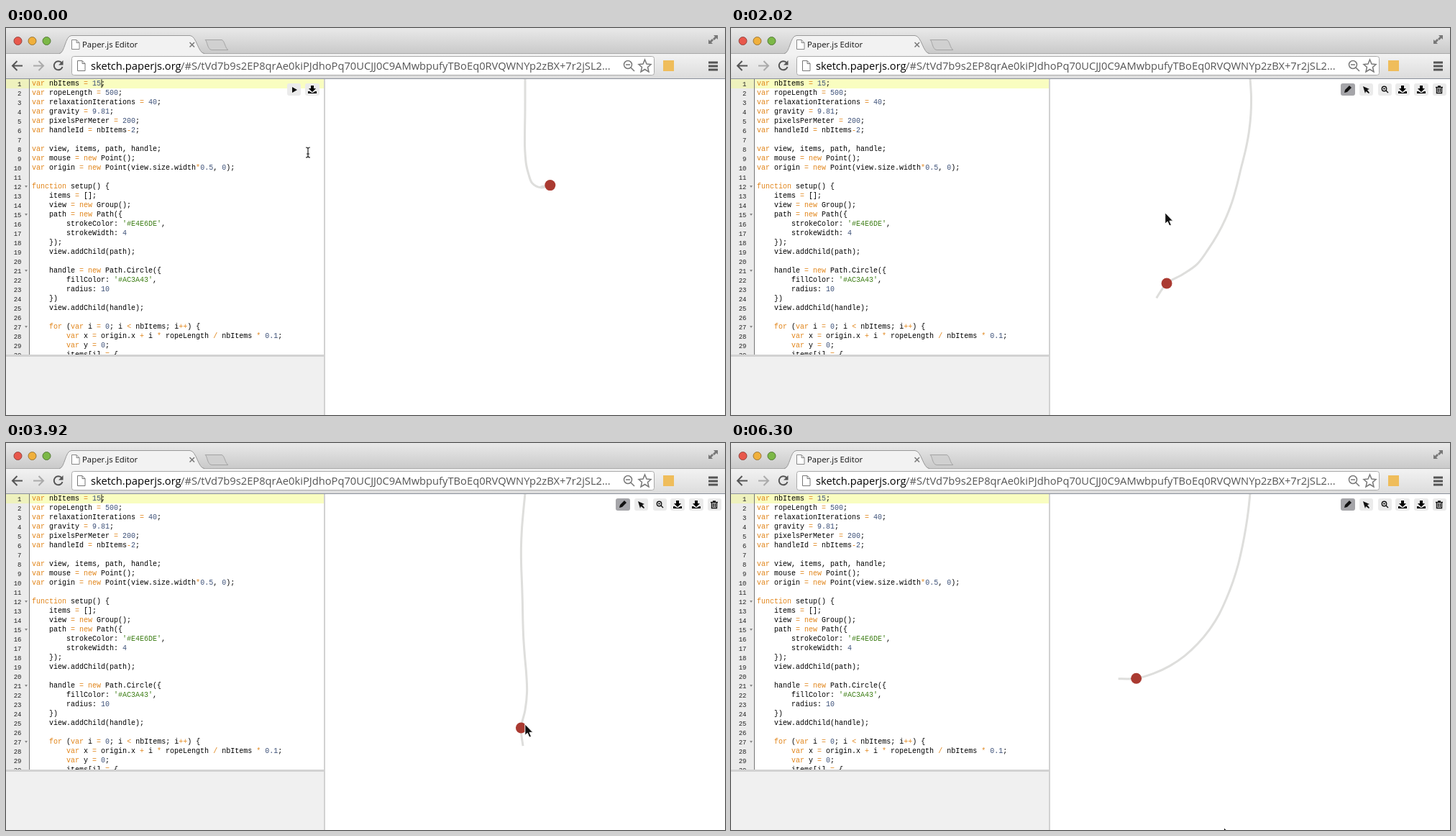
An HTML page for the animation above (6.32 s loop, 1000 by 538 pixels).

```html
<!DOCTYPE html>
<html lang="en">
<head>
<meta charset="utf-8">
<title>Paper.js Editor</title>
<style>
  html, body { margin: 0; width: 100%; height: 100%; overflow: hidden; background: #fff; }
  svg { display: block; width: 1000px; height: 538px; }
  text { white-space: pre; }
  .ui { font-family: "Open Sans", "Noto Sans", sans-serif; }
  #code, #numbers { font: 10px "Liberation Mono", monospace; fill: #000; }
  #numbers { text-anchor: end; font-size: 9px; fill: #222; }
  .word { fill: #e1851a; }
  .num { fill: #3c5078; }
  .str { fill: #3c7d14; }
  .line { fill: none; stroke: #555; stroke-width: 2; }
  .button rect { fill: #ebebeb; }
  .button .ink { fill: none; stroke: #111; stroke-width: 1.4; }
  .button .solid { fill: #111; }
</style>
</head>
<body>
<svg viewBox="0 0 1000 538">
  <defs>
    <linearGradient id="title" x2="0" y2="1"><stop stop-color="#e9e9e9"/><stop offset="1" stop-color="#c9c9c9"/></linearGradient>
    <linearGradient id="bar" x2="0" y2="1"><stop stop-color="#f3f3f3"/><stop offset="1" stop-color="#dcdcdc"/></linearGradient>
    <clipPath id="stage"><path d="M444 71H1000V538H444Z"/></clipPath>
    <clipPath id="editor"><path d="M0 71H442V454H0Z"/></clipPath>
    <g id="download"><path class="solid" d="M8 3h4v4h3l-5 5-5-5h3zM4 11h2l3 2h2l3-2h2v3H4z"/></g>
  </defs>
  <rect width="1000" height="538" fill="#fff"/>

  <g id="chrome">
    <rect width="1000" height="36" fill="url(#title)"/>
    <rect y="35" width="1000" height="35" fill="url(#bar)"/>
    <path d="M0 35.5H76M274 35.5H1000" stroke="#aaa"/>
    <path d="M74 36C82 35 82 11 91 10.5H256C265 11 267 35 276 36Z" fill="#f2f2f2"/>
    <path d="M74 35.5C82 35 82 11 91 10.5H256C265 11 267 35 276 35.5" fill="none" stroke="#999"/>
    <path d="M277 16.5H300C304 17 305 29 309 30.5H286C280 30 280 18 277 16.5Z" fill="#d0d0d0" stroke="#a4a4a4"/>
    <circle cx="16.5" cy="18" r="5.5" fill="#e8584c" stroke="#94443e"/>
    <circle cx="36.5" cy="18" r="5.5" fill="#f0b03c" stroke="#997535"/>
    <circle cx="56.5" cy="18" r="5.5" fill="#7cb847" stroke="#547a36"/>
    <path d="M91.5 16.5H98L102 20.5V29.5H91.5ZM98 16.5V20.5H102" fill="#fff" stroke="#888"/>
    <text class="ui" x="106" y="27" font-size="11.4" fill="#111">Paper.js Editor</text>
    <path d="M255.5 20L262 26.5M262 20L255.5 26.5" stroke="#777" stroke-width="1.5"/>
    <path d="M984 10H990V16L988 14 985 17 983 15 986 12ZM977 16V22H983L981 20 984 17 982 15 979 18Z" fill="#777"/>
    <path class="line" d="M23 52.5H9M15.5 46L9 52.5L15.5 59"/>
    <path class="line" d="M38 52.5H52M45.5 46L52 52.5L45.5 59" style="stroke:#aaa"/>
    <path class="line" d="M77 48A6 6 0 1 0 78.5 54"/><path d="M79.5 45V51.5H73Z" fill="#555"/>
    <rect x="91.5" y="39.5" width="810" height="26" rx="3" fill="#fff" stroke="#aaa"/>
    <path d="M99.5 45.5H106L110 49.5V59.5H99.5ZM106 45.5V49.5H110" fill="#fff" stroke="#777"/>
    <text class="ui" x="118" y="58" font-size="14.7" fill="#000">sketch.paperjs.org</text>
    <text class="ui" x="243" y="58" font-size="14.7" fill="#555">/#S/tVd7b9s2EP8qrAe0kiPJdhoPq70UCJJ0C9AMwbpufyTBoEq0RVQWNYp2zBX+7r2jSL2...</text>
    <g fill="none" stroke="#777" stroke-width="1.5">
      <circle cx="865" cy="51" r="5.5"/><path d="M862 51H868M869 55L874 60"/>
      <path d="M888.5 44L891 50 897 50.5 892.5 54.5 894 61 888.5 57.5 883 61 884.5 54.5 880 50.5 886 50Z"/>
    </g>
    <rect x="914" y="45" width="15" height="15" fill="#efbd5b"/>
    <path d="M977 48H990M977 53H990M977 58H990" stroke="#555" stroke-width="3"/>
    <path d="M0 70.5H1000" stroke="#8b919c"/>
  </g>

  <g clip-path="url(#editor)">
    <rect y="71" width="32" height="384" fill="#ebebeb"/>
    <rect y="71" width="442" height="13" fill="#f9fdc0"/>
    <rect y="71" width="32" height="13" fill="#eef1bd"/>
    <path d="M32.5 71V455" stroke="#777"/>
    <g id="numbers"></g>
    <g id="code"></g>
  </g>
  <path id="caret" d="M133 71.5V83" stroke="#111"/>
  <rect y="455" width="442" height="83" fill="#f0f0f0"/>
  <path d="M0 455.5H443" stroke="#d2d2d2" stroke-width="3"/>
  <path d="M443 71V538" stroke="#d2d2d2" stroke-width="2"/>

  <g id="runButtons">
    <g class="button" transform="translate(391 77)"><rect width="19" height="17" rx="3"/><path class="solid" d="M7 5L14 9L7 13Z"/></g>
    <g class="button" transform="translate(416 77)"><rect width="20" height="17" rx="3"/><use href="#download"/></g>
  </g>

  <g clip-path="url(#stage)">
    <path id="rope" fill="none" stroke="#dededc" stroke-width="3"/>
    <circle id="handle" r="7.5" fill="#aa3a31"/>
  </g>

  <g id="tools">
    <g class="button" transform="translate(848 77)"><rect width="20" height="17" rx="3" style="fill:#a5a5a9"/><path class="solid" d="M5 13L6 9 12 3 15 6 9 12Z"/></g>
    <g class="button" transform="translate(874 77)"><rect width="19" height="17" rx="3"/><path class="solid" d="M5 4L14 8 11 9 14 13 13 14 9 11 8 14Z"/></g>
    <g class="button" transform="translate(900 77)"><rect width="19" height="17" rx="3"/><circle class="ink" cx="8.5" cy="7.5" r="3.2"/><path class="ink" d="M11 10L14 13M7 7.5H10"/></g>
    <g class="button" transform="translate(924 77)"><rect width="20" height="17" rx="3"/><use href="#download"/></g>
    <g class="button" transform="translate(950 77)"><rect width="20" height="17" rx="3"/><use href="#download"/></g>
    <g class="button" transform="translate(976 77)"><rect width="19" height="17" rx="3"/><path class="ink" d="M4 5.5H14M7 4H11M5.5 6V13.5H12.5V6M7.7 7V12M10.3 7V12"/></g>
  </g>

  <path id="beam" fill="none" stroke="#222" stroke-width="1.2" d="M-3 -7Q0 -7 0 -5Q0 -7 3 -7M0 -5V5M-3 7Q0 7 0 5Q0 7 3 7M-2 2H2"/>
  <path id="arrow" fill="#111" stroke="#fff" d="M0 -.5V15L3.5 12 6 17.8 8.7 16.7 6.2 11H11Z"/>
</svg>
<script>
const LOOP = 6320, STEP = 20, ORIGIN = [722, 70], SEGMENTS = 13;
const $ = id => document.getElementById(id);

const source = `var nbItems = 15;
var ropeLength = 500;
var relaxationIterations = 40;
var gravity = 9.81;
var pixelsPerMeter = 200;
var handleId = nbItems-2;

var view, items, path, handle;
var mouse = new Point();
var origin = new Point(view.size.width*0.5, 0);

function setup() {
    items = [];
    view = new Group();
    path = new Path({
        strokeColor: '#E4E6DE',
        strokeWidth: 4
    });
    view.addChild(path);

    handle = new Path.Circle({
        fillColor: '#AC3A43',
        radius: 10
    })
    view.addChild(handle);

    for (var i = 0; i < nbItems; i++) {
        var x = origin.x + i * ropeLength / nbItems * 0.1;
        var y = 0;
        items[i] = {`.split('\n');

const tokens = /('[^']*')|(\b(?:var|new|function|for)\b|[=*\/+<-]+)|(\b\d+(?:\.\d+)?)/g;
const colour = line => line.replace(tokens, (text, str, word) =>
  `<tspan class="${str ? 'str' : word ? 'word' : 'num'}">${text.replace('<', '&lt;')}</tspan>`);

source.forEach((line, i) => {
  const y = 80 + 13 * i, indent = line.search(/\S|$/);
  $('code').innerHTML += `<text x="${36 + 6 * indent}" y="${y}">${colour(line.trim())}</text>`;
  $('numbers').innerHTML += `<text x="21.5" y="${y + 1}">${i + 1}</text>`;
  if (/(function|Path).*\{$|^ +for/.test(line))
    $('numbers').innerHTML += `<path d="M26 ${y - 4}h4l-2 3z" fill="#888"/>`;
});

// A pose bends the rope through evenly spaced headings in degrees: 0 is right, 90 is down.
function pose(t, headings, tail = headings.at(-1), length = 325) {
  const bend = Array.from({ length: SEGMENTS }, (_, i) => {
    const u = i / (SEGMENTS - 1) * (headings.length - 1), k = Math.floor(u);
    return headings[k] + (u - k) * ((headings[k + 1] ?? headings[k]) - headings[k]);
  });
  return { t, v: [...bend, tail, length] };
}

const ropeKeys = [
  pose(0, [90, 90, 91, 90, 84, 68, -14], 170, 174),
  pose(300, [88, 85]),
  pose(900, [90, 90]),
  pose(1420, [130, 148, 127, 86, 74], 254, 322),
  pose(1700, [80, 235]),
  pose(2200, [92, 88]),
  pose(2660, [78, 73, 66, 61, 80, 150, 183, 182, 180, 178, 178, 8, -4], 204, 332),
  pose(2920, [125, -75]),
  pose(3380, [-6, 10, 42, 78, 103, 104, 102, 118, 146, 162, 135, 52, -16], 164),
  pose(3750, [85, 95]),
  pose(4480, [98.5, 85], 75, 335),
  pose(4760, [108, 98]),
  pose(5400, [78, 20]),
  pose(5640, [87, 80, 69, 56, 24], -37, 327),
  pose(6300, [96, 103, 115, 137, 164], 179)
];

const spot = (t, x, y) => ({ t, v: [x, y] });
const mouseKeys = [
  spot(0, 420, 173), spot(660, 446, 205), spot(920, 726, 412), spot(1420, 605.5, 344.5),
  spot(1700, 512, 172), spot(2200, 660, 300), spot(2660, 713, 206), spot(2920, 880, 158),
  spot(3380, 742, 261), spot(4480, 722, 515), spot(4900, 700, 545), spot(5640, 686.5, 531.5),
  spot(6300, 685.5, 535)
];

function sample(keys, t) {
  const i = keys.findIndex(k => k.t > t) - 1;
  if (i < 0) return keys.at(-1).v;
  const a = keys[i], b = keys[i + 1], before = keys[i - 1] || a, after = keys[i + 2] || b;
  const span = b.t - a.t, u = (t - a.t) / span, w = 1 - u;
  return a.v.map((p, n) => {
    const q = b.v[n];
    const out = (q - before.v[n]) / (b.t - before.t) * span;
    const into = (after.v[n] - p) / (after.t - a.t) * span;
    return p * (1 + 2 * u) * w * w + out * u * w * w + q * u * u * (3 - 2 * u) - into * u * u * w;
  });
}

function smoothPath(pts) {
  const at = i => pts[Math.max(0, Math.min(pts.length - 1, i))];
  const lean = (p, a, b, s) => [p[0] + s * (b[0] - a[0]) / 6, p[1] + s * (b[1] - a[1]) / 6];
  let d = 'M' + pts[0];
  for (let i = 1; i < pts.length; i++)
    d += `C${lean(at(i - 1), at(i - 2), at(i), 1)} ${lean(at(i), at(i - 1), at(i + 1), -1)} ${at(i)}`;
  return d;
}

const show = (id, on) => $(id).style.display = on ? '' : 'none';
const place = (id, x, y) => $(id).setAttribute('transform', `translate(${x} ${y})`);

function draw(t) {
  const headings = sample(ropeKeys, t), step = headings.pop() / SEGMENTS;
  const joints = [ORIGIN];
  for (const degrees of headings) {
    const [x, y] = joints.at(-1), angle = degrees * Math.PI / 180;
    joints.push([x + step * Math.cos(angle), y + step * Math.sin(angle)]);
  }
  $('rope').setAttribute('d', smoothPath(joints));
  place('handle', ...joints[SEGMENTS]);

  const inCode = t < 660, mouse = sample(mouseKeys, t);
  place('beam', ...mouse);
  place('arrow', ...mouse);
  show('beam', inCode);
  show('arrow', !inCode);
  show('runButtons', inCode);
  show('tools', !inCode && (t < 4800 || t >= 5400));
  show('caret', (t + 124) % 558 < 279);
}

const start = performance.now();
function tick() {
  const t = (performance.now() - start) % LOOP;
  draw(Math.floor(t / STEP) * STEP);
  requestAnimationFrame(tick);
}
tick();
</script>
</body>
</html>
```
